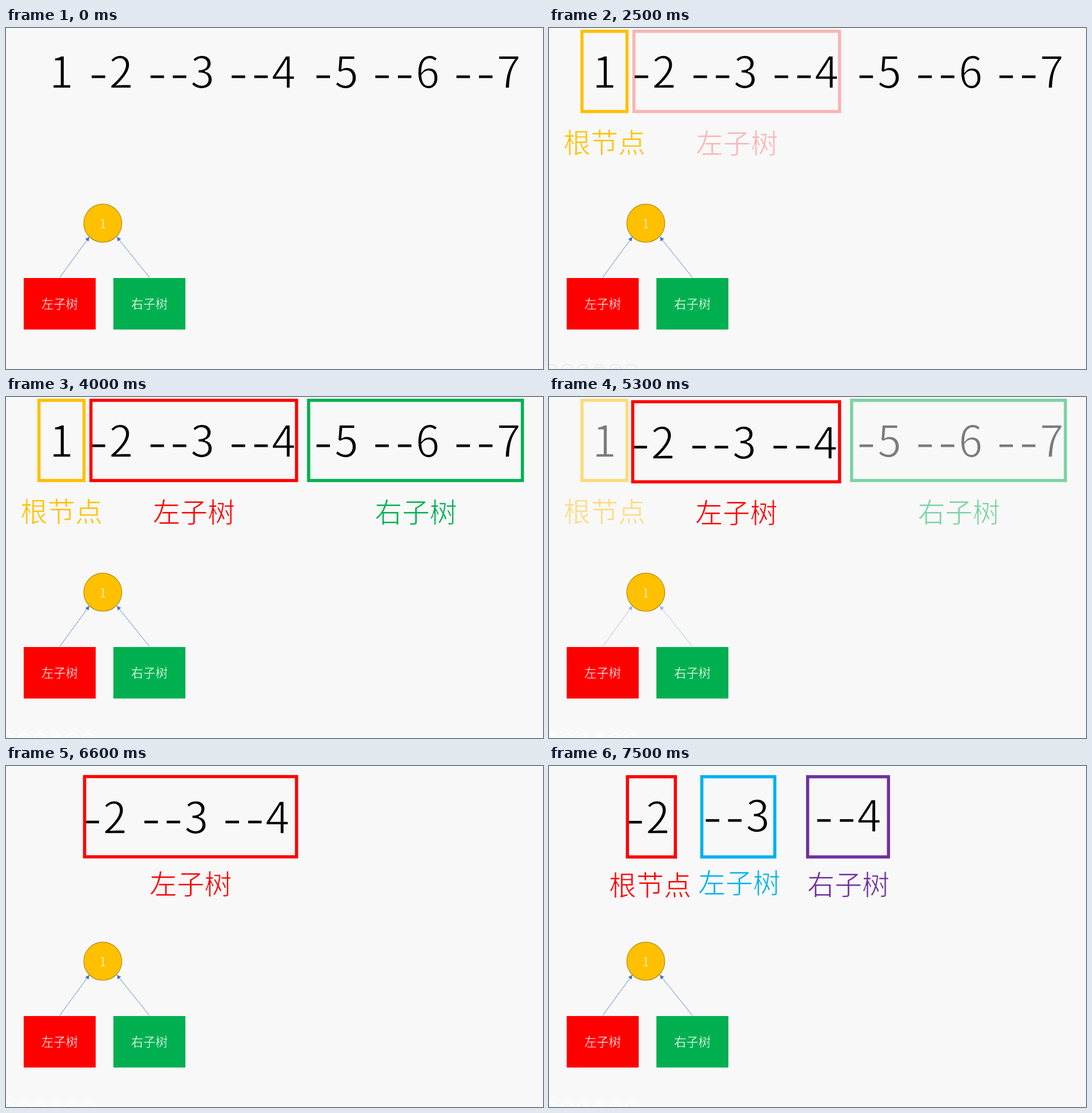
Recreate the animation shown at these times as an HTML page. Size 940 by 596 pixels, loop 8000 ms.

```html
<!DOCTYPE html>
<html lang="zh">
<head>
<meta charset="utf-8">
<style>
html, body { margin: 0; width: 100%; height: 100%; overflow: hidden; background: #f8f8f8; }
svg { display: block; width: 100vw; height: 100vh; }
/* A stroke in the backdrop colour thins the regular weight to a light one. */
text { font-family: "Noto Sans CJK SC", "Noto Sans CJK", "Noto Sans", sans-serif; font-weight: 300; stroke: #f8f8f8; }
.digit { font-size: 76.5px; text-anchor: middle; stroke-width: 1.7; }
.label { font-size: 48px; stroke-width: 1; }
.small { font-size: 21.4px; fill: #fff; text-anchor: middle; stroke-width: .35; }
.frame { fill: none; stroke-width: 5.5; }
</style>
</head>
<body>
<svg id="stage" viewBox="0 0 940 596">
  <defs>
    <marker id="tip" markerWidth="8" markerHeight="8" refX="7.5" refY="3.7" orient="auto" markerUnits="userSpaceOnUse">
      <path d="M0 0L7.5 3.7L0 7.4Z" fill="#4472c4"/>
    </marker>
  </defs>
  <g id="tools" fill="none"></g>
  <g id="arrows" stroke="#4472c4" stroke-width=".85">
    <path d="M94 436L146 365" marker-end="url(#tip)"/>
    <path d="M251 436L194 365" marker-end="url(#tip)"/>
  </g>
  <circle cx="169.4" cy="341.2" r="33.3" fill="#ffc000" stroke="#b58900" stroke-width="1.2"/>
  <text class="small" x="169.4" y="349.5" style="stroke:#ffc000;stroke-width:.6">1</text>
  <rect x="31" y="437" width="126" height="90" fill="#f00"/>
  <rect x="188" y="437" width="126" height="90" fill="#00b050"/>
  <text class="small" x="94" y="490.3" style="stroke:#f00">左子树</text>
  <text class="small" x="251" y="490.3" style="stroke:#00b050">右子树</text>
  <g id="scene"></g>
</svg>
<script>
const LOOP = 8000, STEP = 100;
const RED = '#f00', GOLD = '#ffc000', GREEN = '#00b050', BLUE = '#00b0f0', PURPLE = '#7030a0';
const $ = id => document.getElementById(id);
const clamp = v => Math.min(1, Math.max(0, v));
const ramp = (t, start, span) => clamp((t - start) / span);

const digit = (x, n) => `<text class="digit" x="${x}" y="105.4">${n}</text>`;
const dash = x => `<path d="M${x} 85.2h23.6" stroke="#000" stroke-width="4.6"/>`;
const label = (x, y, color, s) => `<text class="label" x="${x}" y="${y}" fill="${color}">${s}</text>`;
const box = (x1, x2, y, color) =>
  `<rect class="frame" x="${x1 + 2.75}" y="${y + 2.75}" width="${x2 - x1 - 5.5}" height="140.2" stroke="${color}"/>`;
const group = (id, body) => `<g id="${id}">${body}</g>`;

const three = dash(253) + dash(292) + digit(344, 3);
const four = dash(395) + dash(434.6) + digit(486, 4);

$('scene').innerHTML =
  group('others',
    digit(97, 1) + dash(543.5) + digit(596, 5) + dash(646.5) + dash(686) + digit(738, 6) +
    dash(788.5) + dash(828) + digit(880, 7) +
    group('root', box(55, 139.3, 3, GOLD) + label(25, 218, GOLD, '根节点')) +
    group('right', box(527, 906.7, 3, GREEN) + label(645.5, 218.5, GREEN, '右子树'))) +
  group('two', dash(150) + digit(201.5, 2)) +
  group('tail', three + four) +
  group('left', `<path id="near" class="frame" stroke="${RED}"/>` +
    group('fading', `<path id="far" class="frame" stroke="${RED}"/>` +
      group('leftName', label(257, 218.5, RED, '左子树')))) +
  group('split',
    `<path class="frame" stroke="${RED}" d="M221.2 16V161.7"/>` + label(105, 226.3, RED, '根节点') +
    `<g transform="translate(21.5 10)">${three}</g>` + box(264.7, 398, 16, BLUE) + label(261, 222, BLUE, '左子树') +
    `<g transform="translate(74.5 10)">${four}</g>` + box(450, 597, 16, PURPLE) + label(452, 224.5, PURPLE, '右子树'));

const icons = ['M7-4L0 0L7 4', 'M-4-4L4 0L-4 4', 'M-5 3L5-7M-1 3L7-5', 'M-6-6H5V5H-6ZM-1-6V5M-6-2H5', 'M5 2A5 5 0 1 0-4 2', 'M-5 0H-3M-1 0H1M3 0H5'];
$('tools').innerHTML = icons.map((d, i) =>
  `<g transform="translate(${4 + 28 * i} 599)"><circle r="10.8"/><path d="${d}"/></g>`).join('');

// Cubic timing curve (.25, .1, .25, 1), solved by bisection.
function ease(u) {
  const curve = (s, a, b) => 3 * s * (1 - s) * (1 - s) * a + 3 * s * s * (1 - s) * b + s * s * s;
  let lo = 0, hi = 1;
  for (let i = 0; i < 24; i++) {
    const mid = (lo + hi) / 2;
    if (curve(mid, .25, .25) < u) lo = mid; else hi = mid;
  }
  return curve(lo, .1, 1);
}

const alpha = (id, v) => $(id).setAttribute('opacity', v.toFixed(3));
const move = (id, x, y) => $(id).setAttribute('transform', `translate(${x} ${y})`);

function draw(t) {
  const rootIn = ramp(t, 950, 500), leftIn = ramp(t, 2365, 500);
  const m = ease(ramp(t, 5000, 2000)), swap = ramp(t, 6950, 500);
  const gone = ramp(t, 5000, 600);

  alpha('root', rootIn);
  alpha('right', ramp(t, 3465, 500));
  alpha('others', 1 - gone);
  alpha('arrows', 1 - gone + ramp(t, 5900, 600));

  alpha('left', leftIn);
  alpha('fading', 1 - swap);
  alpha('tail', 1 - swap);
  alpha('split', swap);

  move('two', -11 * m, 13 * m);
  move('tail', -11 * m, 13 * m);
  move('leftName', -6 * m, 6 * m);
  const x = 148.7 - 11.4 * m, top = 5.75 + 13 * m, bottom = top + 140.2;
  $('near').setAttribute('d', `M224 ${top}H${x}V${bottom}H224`);
  $('far').setAttribute('d', `M224 ${top}H508.6V${bottom}H224`);

  const shade = Math.round(220 + 35 * leftIn);
  $('tools').setAttribute('stroke', `rgb(${shade},${shade},${shade})`);
  $('tools').setAttribute('stroke-width', 1 + .6 * leftIn);
  alpha('tools', rootIn);
}

const begin = performance.now();
function tick() {
  const t = (performance.now() - begin) % LOOP;
  draw(Math.floor(t / STEP) * STEP);
  requestAnimationFrame(tick);
}
draw(0);
requestAnimationFrame(tick);
</script>
</body>
</html>
```
